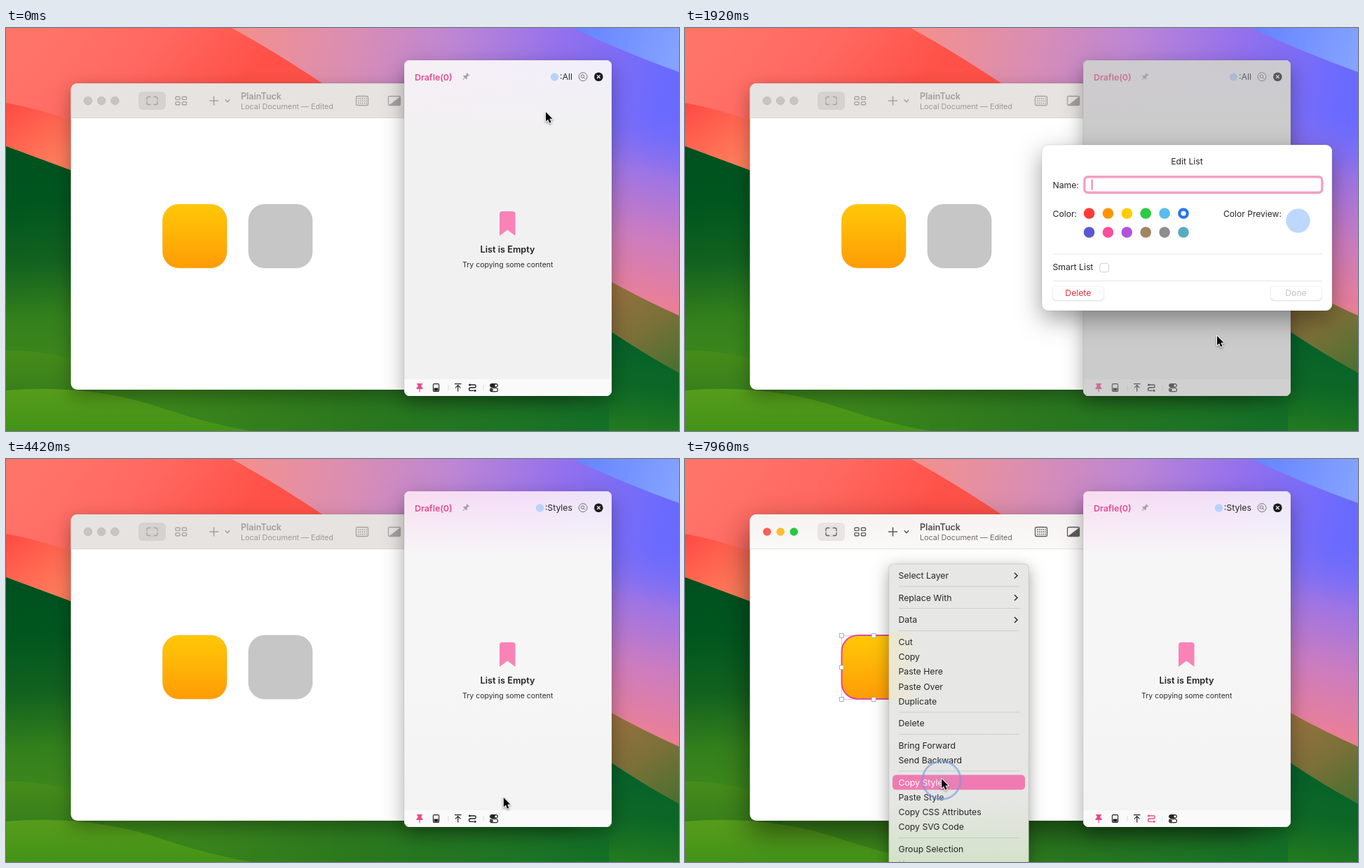
Recreate the animation shown at these times as an HTML page with a canvas. Size 960 by 576 pixels, loop 8 s.

```html
<!DOCTYPE html>
<html lang="en">
<head>
<meta charset="utf-8">
<title>Clipboard lists</title>
<style>
html, body { margin: 0; width: 100%; height: 100%; overflow: hidden; background: #fff; }
canvas { display: block; width: 960px; height: 576px; }
</style>
</head>
<body>
<canvas id="stage" width="960" height="576"></canvas>
<script>
const c = document.getElementById('stage').getContext('2d');
const LOOP = 8000, PINK = '#e9488d', INK = '#262626';
const FONT = 'Inter, "Open Sans", sans-serif';

// Timing
const clicks = [[480, 792, 69], [1290, 759, 440], [3870, 871, 379],
  [5000, 665, 513], [6100, 290, 308], [6710, 290, 308], [7830, 366, 458]];
// start, end, from, control, to
const moves = [
  [0, 380, 770, 120, 776, 92, 792, 69],
  [700, 1210, 792, 69, 768, 260, 759, 440],
  [3250, 3860, 759, 440, 869, 437, 871, 379],
  [3980, 4690, 871, 379, 768, 446, 665, 513],
  [5280, 5920, 665, 513, 470, 430, 290, 308],
  [6980, 7620, 290, 308, 340, 390, 366, 457]
];

const clamp = v => Math.max(0, Math.min(1, v));
const ramp = (t, a, b) => clamp((t - a) / (b - a));
const ease = p => p < .5 ? 4 * p ** 3 : 1 - 4 * (1 - p) ** 3;
const pulse = (t, a, b, d) => ramp(t, a, a + d) * (1 - ramp(t, b, b + d));

function pointer(t) {
  let m = moves[0];
  for (const n of moves) if (t >= n[0]) m = n;
  const p = ease(ramp(t, m[0], m[1])), q = 1 - p;
  return [0, 1].map(i => q * q * m[2 + i] + 2 * p * q * m[4 + i] + p * p * m[6 + i]);
}

// Drawing helpers
function grad(x0, y0, x1, y1, ...cols) {
  const g = c.createLinearGradient(x0, y0, x1, y1);
  cols.forEach((k, i) => g.addColorStop(i / (cols.length - 1), k));
  return g;
}
function box(x, y, w, h, r, fill, stroke, lw = 1) {
  c.beginPath();
  c.roundRect(x, y, w, h, r);
  if (fill) { c.fillStyle = fill; c.fill(); }
  if (stroke) { c.strokeStyle = stroke; c.lineWidth = lw; c.stroke(); }
}
function dot(x, y, r, fill, stroke, lw = 1) {
  c.beginPath();
  c.arc(x, y, r, 0, 7);
  if (fill) { c.fillStyle = fill; c.fill(); }
  if (stroke) { c.strokeStyle = stroke; c.lineWidth = lw; c.stroke(); }
}
function shape(d, fill, stroke, lw = 1.3) {
  const p = new Path2D(d);
  if (fill) { c.fillStyle = fill; c.fill(p); }
  if (stroke) { c.strokeStyle = stroke; c.lineWidth = lw; c.stroke(p); }
}
function text(s, x, y, size, color = INK, weight = 400, align = 'left') {
  c.font = `${weight} ${size}px ${FONT}`;
  c.textAlign = align;
  c.fillStyle = color;
  c.fillText(s, x, y + size * .365);
}
function shadow(alpha, blur, dy, draw) {
  c.save();
  c.shadowColor = `rgba(0,0,0,${alpha})`;
  c.shadowBlur = blur;
  c.shadowOffsetY = dy;
  draw();
  c.restore();
}
function layer(alpha, draw) {
  if (alpha <= 0) return;
  c.save();
  c.globalAlpha = alpha;
  draw();
  c.restore();
}

function wallpaper() {
  c.fillStyle = grad(330, 0, 930, 120, '#f4908c', '#dc8eb0', '#bd86d4', '#9370ee', '#6a6aff');
  c.fillRect(0, 0, 960, 576);
  c.fillStyle = grad(950, 120, 885, 385, 'rgba(112,108,252,0)', '#9c74e6', '#cc7cc0', '#ea7f98');
  c.fillRect(840, 60, 120, 360);
  shape('M808 0Q882 35 960 63V0Z', grad(820, 0, 960, 50, '#6684ff', '#86a4ff'));
  shape('M0 0H322Q386 35 460 85L300 240H0Z', grad(60, 0, 260, 170, '#ff7468', '#ff6860', '#ff5148'));
  shape('M0 107Q50 116 110 138V230H0Z', grad(0, 110, 60, 200, '#ff4a44', '#ff6450', '#ff7c5c'));
  shape('M860 361Q915 391 960 411V520H860Z', grad(870, 370, 950, 490, '#97703f', '#7b7038', '#4c7030'));
  shape('M0 169L140 221V500H860V432Q912 467 960 493V576H0Z',
    grad(0, 0, 960, 0, '#3c8a1c', '#3b851b', '#2c781d', '#1d7424', '#0b6c29'));
  shape('M860 432Q912 467 960 493V576H860Z', grad(900, 450, 880, 576, '#06612a', '#0d6826', '#237a20'));
  shape('M0 169L140 221V520H0Z', grad(0, 170, 20, 500, '#00501f', '#00561f', '#12611f', '#34801c', '#3f8a1c'));
  shape('M0 461Q55 458 140 488V540H0Z', grad(0, 460, 0, 530, '#468c19', '#357d1c'));
  shape('M0 518Q120 508 225 544Q290 566 350 576H0Z', grad(0, 515, 0, 576, '#579c1b', '#439317'));
}

function appWindow(t) {
  const on = t >= 6140;
  const icon = on ? '#5f5d5b' : '#a5a2a0';
  shadow(on ? .5 : .32, on ? 42 : 26, on ? 16 : 9, () => box(92.5, 79, 720, 438, 9, '#fff'));
  c.save();
  c.beginPath(); c.roundRect(92.5, 79, 720, 438, 9); c.clip();
  c.fillStyle = on ? grad(0, 79, 0, 129, '#f6f3f1', '#faf9f8') : '#e6e3e1';
  c.fillRect(92, 79, 721, 50);
  c.fillStyle = on ? '#e2e0de' : '#dad7d5';
  c.fillRect(92, 128, 721, 1);
  c.restore();
  box(92.5, 79, 720, 438, 9, null, 'rgba(0,0,0,.12)', .7);

  ['#ff5f57', '#febc2e', '#28c840'].forEach((k, i) =>
    dot(117 + i * 19.2, 104, 5.8, on ? k : '#c7c4c2', on ? null : '#bbb8b6', .7));
  box(189, 91, 39, 26, 6, on ? '#e8e5e3' : '#d5d2d0');
  box(201, 98.5, 15, 11, 2, null, icon, 1.3);
  c.strokeStyle = on ? '#e8e5e3' : '#d5d2d0';
  shape('M206 98.5h5M206 109.5h5', null, c.strokeStyle, 2);
  shape('M200 104h3M214 104h3', null, c.strokeStyle, 1.4);
  for (const x of [242, 251.5]) for (const y of [98.2, 105.6]) box(x, y, 6, 4.2, 1, null, icon, 1.4);
  shape('M296.5 97.5v13M290 104h13', null, icon, 1.6);
  shape('M312.8 102.3l3.2 3.2 3.2-3.2', null, icon, 1.6);
  text('PlainTuck', 335, 97.5, 12.5, on ? '#504e4c' : '#a19e9c', 600);
  text('Local Document — Edited', 335, 111.7, 10.8, on ? '#6b6967' : '#9c9997');
  box(499.5, 97.5, 17, 13, 2, null, icon, 1.3);
  for (let i = 0; i < 15; i++) {
    c.fillStyle = icon;
    c.fillRect(502 + i % 5 * 2.8, 100 + (i / 5 | 0) * 3.3, 1.5, 1.7);
  }
  box(545.5, 97.5, 17, 13, 2, null, icon, 1.3);
  shape('M546 110.5L562.5 98V110.5Z', icon);

  box(223.5, 252, 91.5, 91, 23, grad(0, 252, 0, 343, '#ffc807', '#ff9c06'), '#e9a51f', .5);
  box(346, 252, 91, 91, 23, '#c6c6c6', '#b5b5b5', .5);
  if (on) {
    box(223.5, 252, 91.5, 91, 23, null, '#f0419b', 2);
    box(223.5, 252.5, 91.5, 91, 0, null, 'rgba(130,130,130,.55)', .7);
    for (const x of [223.5, 269.2, 315]) for (const y of [252.5, 298, 343.5])
      if (x !== 269.2 || y !== 298) box(x - 3, y - 3, 6, 6, 0, '#fff', '#9a9a9a', .8);
  }
}

function panel(t, dim) {
  const fresh = t >= 3980;
  shadow(.34, 28, 10, () => box(568, 46, 296, 480, 8, '#f2f2f2'));
  c.save();
  c.beginPath(); c.roundRect(568, 46, 296, 480, 8); c.clip();
  c.fillStyle = fresh ? grad(0, 120, 0, 500, '#f7f6f7', '#f6f6f6', '#f3f3f3') : '#f2f1f2';
  c.fillRect(568, 46, 296, 480);
  c.fillStyle = fresh ? grad(570, 46, 864, 46, '#f8d9ef', '#f3d9f8', '#eae2fb')
                      : grad(570, 46, 864, 46, '#f8eff6', '#f4effa', '#f0eefb');
  c.fillRect(568, 46, 296, 90);
  c.fillStyle = fresh ? grad(0, 46, 0, 136, 'rgba(247,246,247,.1)', '#f7f6f7')
                      : grad(0, 46, 0, 136, 'rgba(242,241,242,.1)', '#f2f1f2');
  c.fillRect(568, 46, 296, 90);
  c.fillStyle = '#fafafa';
  c.fillRect(568, 502, 296, 24);

  text('Drafle(0)', 583, 70, 12.4, PINK, 600);
  c.save();
  c.translate(656, 69.5); c.rotate(.75);
  shape('M-2.5 -5h5v1.2h-1v3l2 2v1h-7v-1l2-2v-3h-1ZM-.5 2h1v4h-1Z', '#a3a0a5');
  c.restore();
  text(fresh ? ':Styles' : ':All', 808, 70, 12.3, INK, 400, 'right');
  dot(fresh ? 761.5 : 782.5, 70, 5.7, '#b7d3fb');
  dot(823, 69.7, 6, null, '#77747a', 1);
  dot(822.4, 69.1, 2.3, null, '#77747a', 1);
  shape('M824 70.7l2 2', null, '#77747a', 1);
  dot(845.3, 69.7, 6.3, '#19191b');
  shape('M843 67.4l4.6 4.6M847.6 67.4l-4.6 4.6', null, '#fff', 1.3);

  shape('M704 266q0-4 4-4h14.5q4 0 4 4v31l-11.2-8.5-11.3 8.5Z', '#f983b7');
  text('List is Empty', 715.5, 316.7, 12.7, '#232323', 600, 'center');
  text('Try copying some content', 715.7, 338.5, 10.5, '#2d2d2d', 400, 'center');

  shape('M586 508h8v1.5h-1.4v3l2 2.2v1.3h-9.2v-1.3l2-2.2v-3H586ZM589.5 516h1.2v4.3h-1.2Z', PINK);
  box(609.4, 508.6, 8.2, 10.8, 1.3, null, '#222', 1.1);
  c.fillStyle = '#222';
  c.fillRect(610.5, 514.5, 6, 4);
  c.fillStyle = '#dcdcdc';
  c.fillRect(630.5, 510, 1, 8);
  c.fillRect(680.5, 510, 1, 8);
  shape('M640 508.6h9.5M644.7 519.5v-8.5M641 514.3l3.7-3.7 3.7 3.7', null, '#222', 1.2);
  const path = t >= 5090 ? PINK : '#222';
  shape('M662 510h6.2q2 0 2 2t-2 2h-5.5q-2.2 0-2.2 2.2t2.2 2.2h4.3', null, path, 1.3);
  dot(661.5, 510, 1.5, path);
  dot(669, 518.3, 1.5, path);
  box(690.5, 508.5, 11, 4.8, 2.4, '#222', '#222', 1);
  dot(699, 510.9, 1.7, '#fff');
  box(690.5, 514.8, 11, 4.8, 2.4, null, '#222', 1.1);
  dot(693, 517.2, 1.7, '#222');
  if (dim) {
    c.fillStyle = `rgba(160,160,160,${.47 * dim})`;
    c.fillRect(568, 46, 296, 480);
  }
  c.restore();
  box(568, 46, 296, 480, 8, null, 'rgba(0,0,0,.12)', .6);
}

const blue = '#bad5fb', yellow = '#fbe8ba';
const lists = [['All', blue], ['Favorite', blue], ['Localization', '#f3cde4'], ['QVM Titles', '#e1cdf1'],
  ['All', blue], ['Image', yellow], ['File', blue], ['Link', yellow], ['Email', yellow],
  ['Remote', blue], ['From Notes', blue], ['Vidoopa links', '#f8c3c6'], ['Add List']];

function popover(y) {
  const body = 'M697 95H783L790 86Q793 82 796 86L803 95H886Q895 95 895 104V450Q895 459 886 459H697Q688 459 688 450V104Q688 95 697 95Z';
  shadow(.34, 22, 7, () => shape(body, '#f7f6f8'));
  shape(body, grad(0, 90, 0, 459, '#f3f0fa', '#f6f5f7', '#f7f6f7'), 'rgba(0,0,0,.13)', .7);
  c.fillStyle = '#dddbdd';
  c.fillRect(698, 239, 188, 1);
  c.fillRect(698, 425, 188, 1);
  lists.forEach(([name, color], i) => {
    const ry = 120.7 + i * 25.9 + (i > 4 ? 4.8 : 0) + (i > 11 ? 4.9 : 0);
    if (Math.abs(y - ry) < 10.6) box(697, ry - 10.5, 190, 21, 5, '#f3cfe0');
    if (!color) shape(`M709.5 ${ry - 4.7}v9.4M704.8 ${ry}h9.4`, null, '#444', 1.1);
    else if (i < 5) dot(709.5, ry, 5.5, color);
    else box(704, ry - 5.5, 11, 11, 2.5, color);
    text(name, 723, ry, 13.8, '#1c1c1c');
  });
  shape('M868 225l3.3 4 6.5-9.5', null, PINK, 1.7);
}

const swatches = ['#ff3b34', '#ff9505', '#ffcc02', '#2acb45', '#56bdec', '#2474f6',
  '#5a57d2', '#fb4d9a', '#ae51de', '#a18461', '#8d8d8f', '#57acc0'];

function sheet(t) {
  shadow(.38, 34, 12, () => box(509, 167, 414, 237, 9, '#fff'));
  box(509, 167, 414, 237, 9, '#fff', 'rgba(0,0,0,.14)', .7);
  text('Edit List', 716, 190.5, 12.2, INK, 400, 'center');
  text('Name:', 524.5, 224.2, 12.2);
  box(569.8, 212.8, 339, 22.4, 5, '#fff', '#f3a0c4', 3.4);
  const typed = 'Styles'.slice(0, Math.max(0, Math.floor((t - 2320) / 130)));
  text(typed, 580.5, 224.2, 12.2);
  const caret = 580 + c.measureText(typed).width;
  if (t < 2050 || t > 2320 || t < 1800) {
    c.fillStyle = PINK;
    c.fillRect(caret, 216.5, 1.2, 15);
  }
  text('Color:', 524.5, 265.5, 12.2);
  swatches.forEach((k, i) => dot(576.5 + i % 6 * 26.9, i < 6 ? 265 : 292, 7.8, k));
  dot(711, 265, 3.6, '#fff');
  text('Color Preview:', 851, 265.5, 12.1, INK, 400, 'right');
  dot(874.5, 275.5, 17.2, '#bdd8ff');
  c.fillStyle = '#e4e4e4';
  c.fillRect(525, 322.5, 384, 1);
  c.fillRect(525, 361, 384, 1);
  text('Smart List', 524.5, 341.5, 12.2);
  box(591.8, 336.3, 12.6, 12.6, 3, '#fff', '#cfcfcf', 1);
  for (const x of [524.5, 835.5])
    shadow(.22, 2, .6, () => box(x, 369.5, 72.5, 19.5, 5, '#fff'));
  text('Delete', 560.8, 379, 12.2, '#d9333a', 400, 'center');
  text('Done', 871.5, 379, 12.2, typed ? INK : '#c3c3c3', 400, 'center');
}

const rows = [['Select Layer', 166.7], ['Replace With', 198.3], ['Data', 230], ['Cut', 261.8], ['Copy', 283],
  ['Paste Here', 304], ['Paste Over', 325.1], ['Duplicate', 346.2], ['Delete', 378], ['Bring Forward', 409.5],
  ['Send Backward', 430.7], ['Copy Style', 462.2], ['Paste Style', 483.3], ['Copy CSS Attributes', 504.5],
  ['Copy SVG Code', 525.7], ['Group Selection', 557.3], ['Ungroup', 578.5]];

function menu(x, y) {
  shadow(.36, 22, 6, () => box(290.8, 150, 199.5, 470, 6, '#e7e7e5'));
  box(290.8, 150, 199.5, 470, 6, grad(0, 150, 0, 600, '#e7e7e5', '#e7e7e5', '#e7e7e5', '#e6e7e4', '#cfe0c3'),
    'rgba(0,0,0,.16)', .7);
  c.fillStyle = grad(291, 0, 335, 0, 'rgba(250,230,150,.28)', 'rgba(250,230,150,0)');
  c.fillRect(291, 246, 45, 100);
  c.fillStyle = 'rgba(0,0,0,.11)';
  for (const sy of [181.5, 213, 245, 361.5, 393, 445.5, 541]) c.fillRect(305, sy, 172, 1);
  rows.forEach(([name, ry], i) => {
    const hot = x > 296 && Math.abs(y - ry) < 10.6;
    if (hot) box(296, ry - 10.7, 189, 21.2, 5, '#f07bb2');
    text(name, 304.5, ry, 12.25, hot ? '#fff' : i === 16 ? '#a2aa9c' : INK);
    if (i < 3) shape(`M470 ${ry - 4}l4 4-4 4`, null, '#333', 1.6);
  });
}

function ring(t) {
  for (const [at, x, y] of clicks) {
    const age = t - at;
    if (age < 0 || age > 380) continue;
    const r = 29 - 19 * (1 - clamp(age / 170)) ** 1.6;
    layer(ramp(age, 0, 80) * (1 - .35 * ramp(age, 80, 140)) * (1 - ramp(age, 180, 380)), () =>
      dot(x, y + 1, r, 'rgba(150,180,235,.1)', 'rgba(116,153,222,.85)', 2.9));
  }
}

function arrow(x, y) {
  c.save();
  c.translate(x, y);
  c.lineJoin = 'round';
  const d = 'M0 0V13.6L3.1 10.7 5.3 15.8 7.6 14.8 5.4 9.8H9.6Z';
  shadow(.4, 3, 1.5, () => shape(d, null, '#fff', 2));
  shape(d, '#080808');
  c.restore();
}

function draw(t) {
  const [x, y] = pointer(t);
  const form = pulse(t, 1520, 3960, 160);
  c.clearRect(0, 0, 960, 576);
  wallpaper();
  appWindow(t);
  panel(t, form);
  layer(pulse(t, 560, 1400, 120), () => popover(y));
  layer(form, () => {
    const s = .94 + .06 * form;
    c.translate(716, 285); c.scale(s, s); c.translate(-716, -285);
    sheet(t);
  });
  if (t >= 6750) menu(x, y);
  ring(t);
  arrow(x, y);
}

function tick(now) {
  draw(now % LOOP);
  requestAnimationFrame(tick);
}
requestAnimationFrame(tick);
</script>
</body>
</html>
```
